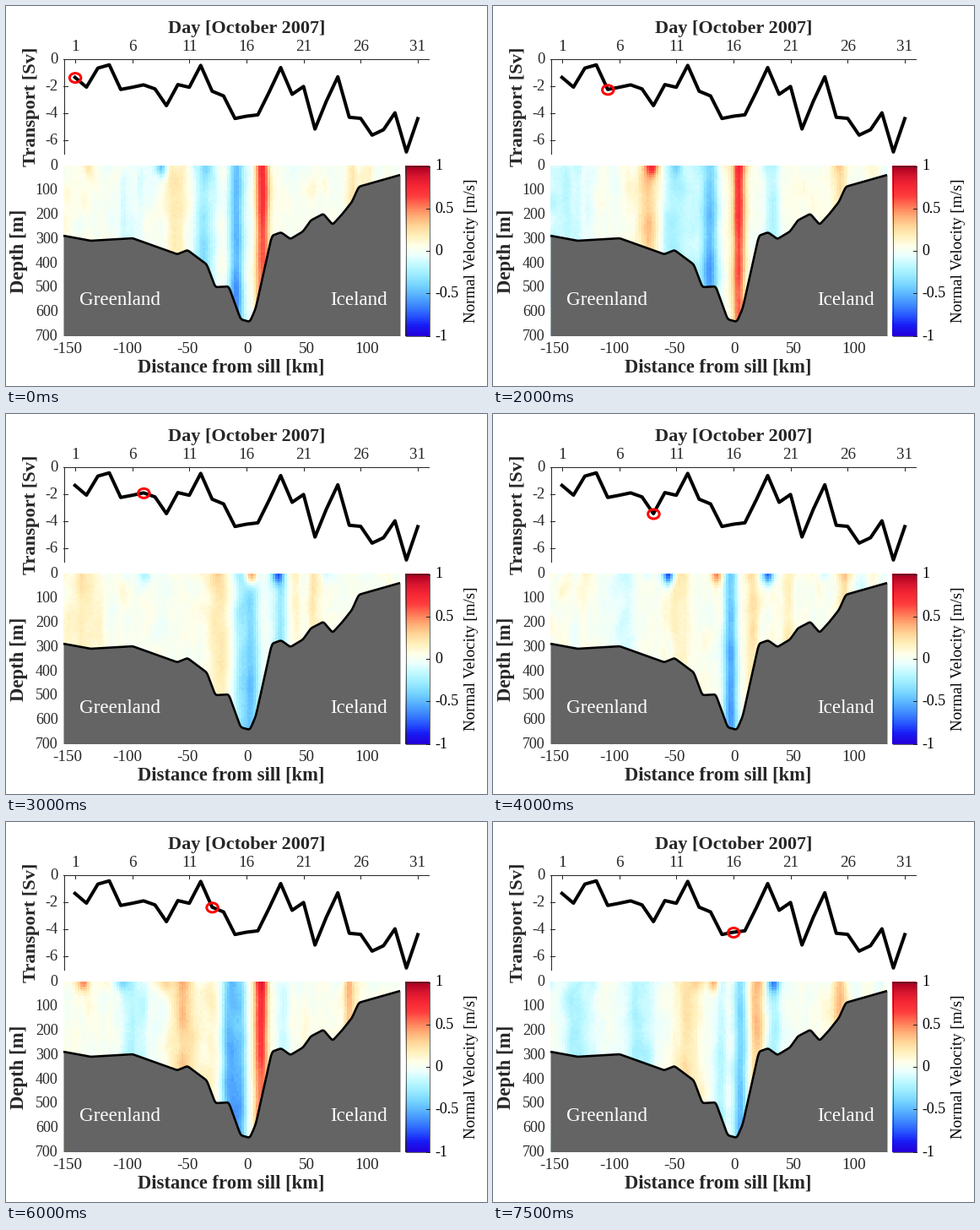
These frames come from a looping animation (570 by 450 pixels, 8000 ms). A matplotlib script:

```python
import numpy as np
import matplotlib.pyplot as plt
from matplotlib.animation import FuncAnimation
from matplotlib.colors import LinearSegmentedColormap
from matplotlib.patches import Ellipse

W, H, DPI = 570, 450, 100
PX = 72 / DPI
INK = "#262626"
LEFT, RIGHT, TOP, BOTTOM = 68, 467, 189, 390
SILL = 285
NX, NY = 140, 70
DAYS = 16

plt.rcParams["font.family"] = "Liberation Serif"
fig = plt.figure(figsize=(W / DPI, H / DPI), dpi=DPI, facecolor="white")
ax = fig.add_axes([0, 0, 1, 1])

cmap = LinearSegmentedColormap.from_list("flow", [
    "#2400d8", "#181cf7", "#2857ff", "#3d87ff", "#56b0ff", "#75d3ff",
    "#99eaff", "#bcf9ff", "#eaffff", "#ffffea", "#fff1bc", "#ffd699",
    "#ffac75", "#ff7856", "#ff3d3d", "#f72735", "#d8152f", "#a50021"], 256)

X, Y = np.meshgrid(LEFT + (np.arange(NX) + .5) * (RIGHT - LEFT) / NX,
                   TOP + (np.arange(NY) + .5) * (BOTTOM - TOP) / NY)
DEPTH = (Y - TOP) / (BOTTOM - TOP)


def blur(a, n, axis):
    k = np.hanning(n + 2)[1:-1]
    pad = [(0, 0), (0, 0)]
    pad[axis] = (n // 2, n // 2)
    a = np.pad(a, pad, mode="edge")
    return np.apply_along_axis(np.convolve, axis, a, k / k.sum(), mode="valid")


def section(currents, patches):
    """Full-depth currents (x, speed), wider on the western shelf, and
    patches (x, speed) that stay near the surface."""
    v = np.full(X.shape, .03)
    for x, speed in currents:
        width = 8 + .08 * max(0, SILL - x)
        # Outflow strengthens towards the bed, inflow fades
        shear = 1 - .4 * np.sign(speed) * (DEPTH - .3)
        v += speed * shear * np.exp(-((X - x) / width) ** 2)
    for x, speed in patches:
        v += speed * np.exp(-((X - x) / 7) ** 2 - ((Y - TOP) / 13) ** 2)
    return v


keys = {
    1: section([(150, -.1), (202, .15), (234, -.33), (273, -.52),
                (304, .68), (412, .17), (430, .12)],
               [(184, -.55), (98, .2), (240, -.2)]),
    5: section([(85, -.22), (184, .27), (213, -.3), (236, -.2), (257, -.5),
                (291, .66), (330, -.25), (412, .22)],
               [(189, .4), (218, -.2)]),
    7: section([(95, .16), (252, .2), (280, -.3), (292, -.36), (325, -.36),
                (345, .12), (365, .14)],
               [(291, .8), (322, -.5), (165, -.2)]),
    9: section([(150, -.12), (220, .15), (282, -.5), (308, .18), (350, .14),
                (416, .2), (436, -.18)],
               [(208, -.9), (265, .45), (326, -.7)]),
    11: section([(78, .12), (144, -.3), (216, .2), (268, -.36), (283, -.36),
                 (306, .7), (335, -.15), (375, -.15)],
                [(240, .2), (78, .18)]),
    13: section([(150, -.24), (210, .27), (242, .12), (264, -.42),
                 (277, -.42), (302, .66), (329, -.2), (407, .32)],
                [(92, .45), (138, -.25), (190, .25)]),
    16: section([(100, -.24), (174, -.27), (230, .22), (271, -.2),
                 (293, -.42), (313, .32), (332, -.26), (411, .3)],
                [(262, .4), (332, -.5)]),
}


def texture(day):
    rng = np.random.default_rng(day)
    streak = blur(rng.normal(0, .03, (1, NX)), 3, 1)
    patch = blur(blur(rng.normal(0, 1, (NY, NX)), 7, 1), 15, 0)
    return streak + .025 * patch / patch.std() + rng.normal(0, .01, X.shape)


def velocity(day):
    a = max(k for k in keys if k <= day)
    b = min(k for k in keys if k >= day)
    t = (day - a) / max(b - a, 1)
    return (1 - t) * keys[a] + t * keys[b] + texture(day)


def label(x, y, s, size=19, color=INK, **kw):
    ax.text(x, y, s, fontsize=size * PX, color=color, zorder=6, **kw)


def rule(xs, ys, width=1, color=INK, **kw):
    ax.plot(xs, ys, color=color, lw=width * PX, **kw)


def day_x(day):
    return 81.8 + 13.54 * (day - 1)


# Transport series
transport = np.array([
    -1.33, -2.05, -.64, -.4, -2.22, -2.06, -1.88, -2.18, -3.42, -1.86, -2.06,
    -.44, -2.35, -2.7, -4.37, -4.2, -4.1, -2.4, -.6, -2.58, -2, -5.15, -3.08,
    -1.28, -4.28, -4.36, -5.6, -5.2, -3.95, -6.85, -4.38])
series_x = day_x(np.arange(1, 32))
series_y = 63.3 - 16 * transport
axis_y = 62.5
rule([LEFT + .5, 501], [axis_y, axis_y])
rule([LEFT + .5, LEFT + .5], [axis_y, 174.5])
for d in range(1, 32, 5):
    rule([day_x(d)] * 2, [axis_y, axis_y + 4.5])
    label(day_x(d), 53, str(d), ha="center")
for v in range(0, -7, -2):
    y = axis_y - 16 * v
    rule([LEFT, LEFT + 5], [y, y])
    label(61.5, y + 6, str(v), 18.5, ha="right")
rule(series_x, series_y, 4, "black", solid_joinstyle="round", zorder=3)
marker = ax.add_patch(Ellipse((0, 0), 13.5, 11, fill=False, ec="red",
                              lw=3 * PX, zorder=5))

# Velocity section
image = ax.imshow(np.zeros((NY, NX)), cmap=cmap, vmin=-1, vmax=1,
                  extent=(LEFT, RIGHT, BOTTOM, TOP), interpolation="nearest",
                  aspect="auto", zorder=1)
bed = np.array([
    (68, 272), (100, 278), (150, 275), (203, 294), (215, 289), (238, 306),
    (248, 333), (264, 332), (278, 371), (289, 374), (296, 358), (315, 272),
    (326, 268), (337, 276), (352, 267), (361, 254), (376, 246), (387, 259),
    (398, 247), (410, 232), (418, 214), (467, 200)])
bed_x = np.arange(LEFT, RIGHT + .5, .5)
bed_y = blur(np.interp(bed_x, *bed.T)[None], 13, 1)[0]
ax.fill_between(bed_x, bed_y, BOTTOM + .5, color="#646464", lw=0, zorder=2)
rule(bed_x, bed_y, 2.6, "black", solid_capstyle="butt", zorder=3)
for i in range(8):
    label(61.5, 194.5 + i * 28.75, str(100 * i), 18, ha="right")
for km in range(-150, 101, 50):
    label(285.8 + 1.42 * km, 411, str(km), ha="center")
label(87, 353.5, "Greenland", 23, "white")
label(384.5, 353.5, "Iceland", 23, "white")

# Colour bar
ax.imshow(np.linspace(1, -1, 201)[:, None], cmap=cmap, vmin=-1, vmax=1,
          extent=(473, 502, 391, 189), aspect="auto", zorder=1)
rule([473.5, 501.5, 501.5, 473.5, 473.5], [189.5, 189.5, 390.5, 390.5, 189.5],
     .7, zorder=3)
for i, s in enumerate(["1", "0.5", "0", "-0.5", "-1"]):
    y = 189.5 + 50.25 * i
    rule([498, 501.5], [y, y], zorder=3)
    label(508, y + 5, s, 18, "black")

label(285, 32.2, "Day [October 2007]", 22.3, ha="center", weight="bold")
label(267, 433.5, "Distance from sill [km]", 22.6, ha="center", weight="bold")
side = dict(rotation=90, ha="center", va="center")
label(29.5, 119, "Transport [Sv]", 22.5, weight="bold", **side)
label(16, 290.5, "Depth [m]", 22.8, weight="bold", **side)
label(551, 290, "Normal Velocity [m/s]", 19, "black", **side)

ax.set_xlim(0, W)
ax.set_ylim(H, 0)
ax.axis("off")


def draw(i):
    image.set_data(velocity(i + 1))
    marker.center = (series_x[i] + .3, series_y[i] + .5)
    return image, marker


anim = FuncAnimation(fig, draw, frames=DAYS, interval=500, repeat=True,
                     repeat_delay=0)
plt.show()
```
